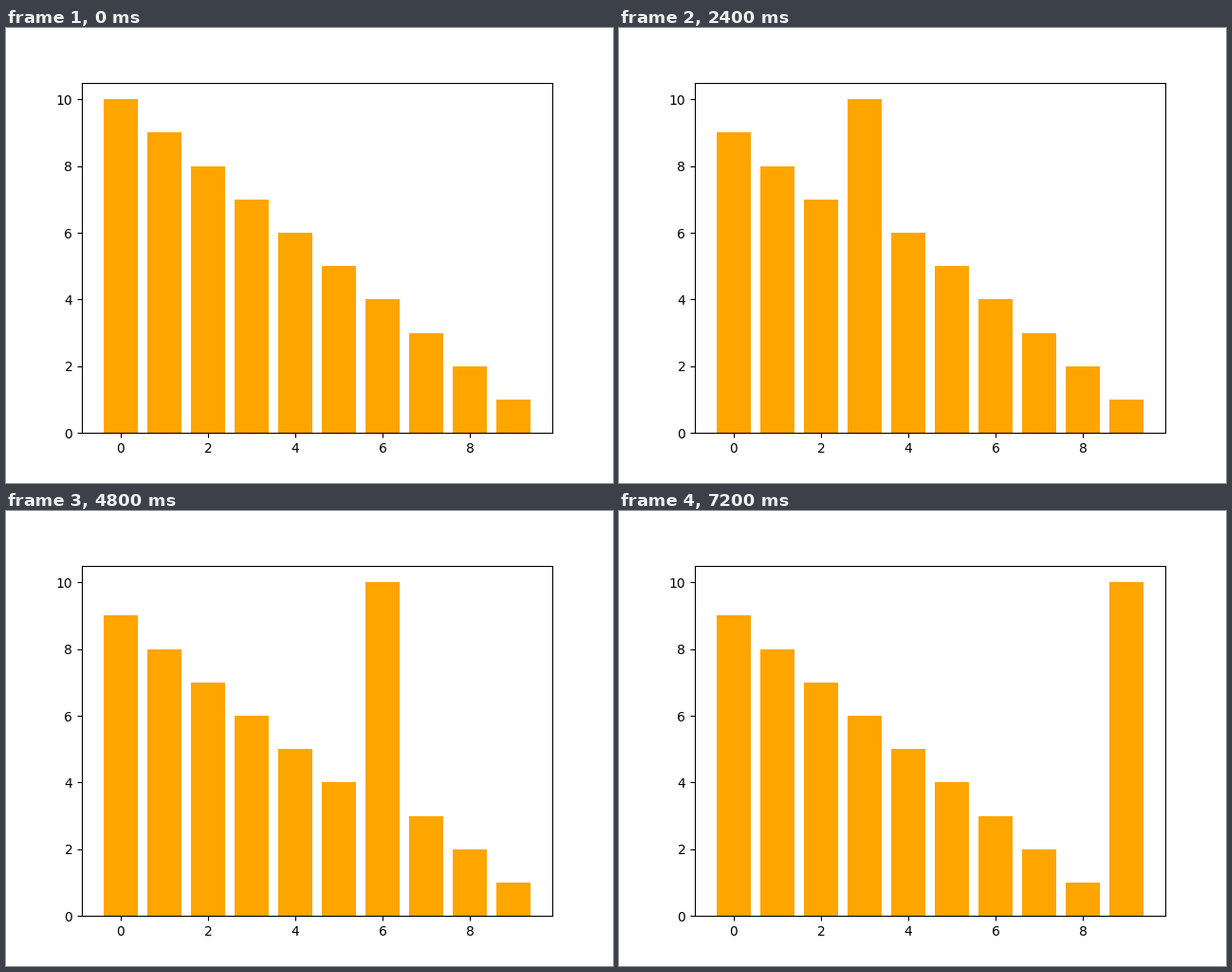
These frames come from a looping animation (640 px wide and 480 px high, 8 s). A matplotlib script:

```python
import matplotlib.pyplot as plt
from matplotlib.animation import FuncAnimation

COUNT = 10
STEP_MS = 800

fig, ax = plt.subplots(figsize=(6.4, 4.8), dpi=100)
bars = ax.bar(range(COUNT), range(COUNT, 0, -1), color="orange")


def heights_after(swaps):
    """First bubble sort pass: the tallest bar moves right by one per swap."""
    heights = list(range(COUNT, 0, -1))
    heights.insert(swaps, heights.pop(0))
    return heights


def update(step):
    for bar, height in zip(bars, heights_after(step)):
        bar.set_height(height)
    return bars.patches


anim = FuncAnimation(fig, update, frames=COUNT, interval=STEP_MS,
                     repeat=True, repeat_delay=0, blit=False)
plt.show()
```
